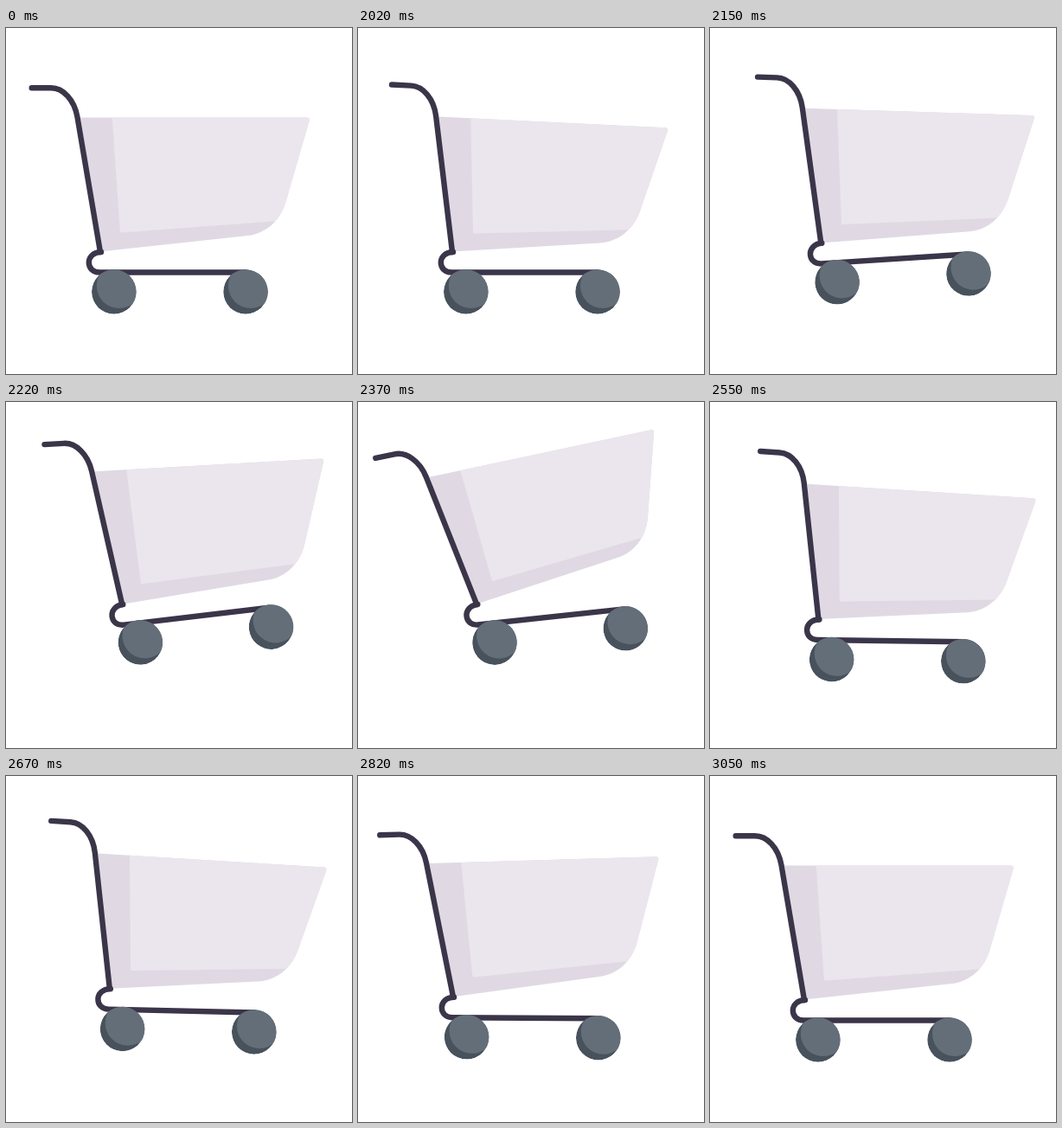
Animation of 400 by 400 pixels, one loop 3.07 s. Source, as an HTML page:

```html
<!DOCTYPE html>
<html lang="en">
<head>
<meta charset="utf-8">
<title>Hopping cart</title>
<style>
  html, body { margin: 0; width: 100%; height: 100%; overflow: hidden; background: #fff; }
  svg { display: block; width: 100%; height: 100%; }
  .bar { fill: none; stroke: #3b3549; stroke-width: 6.4; stroke-linecap: round; stroke-linejoin: round; }
</style>
</head>
<body>
<svg viewBox="0 0 400 400">
  <defs>
    <path id="tub" d="M86 103.5H348Q351.500 103.500 350.700 107L323.500 201C317.500 222 301 237.500 280 240L109 258.500Z"/>
    <clipPath id="inTub"><use href="#tub"/></clipPath>
    <clipPath id="inWheel"><circle r="25.8"/></clipPath>
    <g id="wheel" clip-path="url(#inWheel)">
      <circle r="25.8" fill="#48525d"/>
      <circle cx="6" cy="-7" r="26" fill="#646e78"/>
    </g>
  </defs>
  <g id="cart">
    <g id="basket">
      <use href="#tub" fill="#e0d9e4"/>
      <path d="M122.500 100L131.900 235Q132 236.500 133.500 236.400L311 223.300L370 200V100Z" fill="#ebe6ed" clip-path="url(#inTub)"/>
      <path class="bar" d="M29.700 69.200H52C66 69.200 79 83 82.500 103L109 259"/>
    </g>
    <path class="bar" d="M110 259C101 259 95.800 265 95.800 271C95.800 278 101 282.500 108 282.500H277"/>
    <use href="#wheel" transform="translate(124.800 305)"/>
    <use href="#wheel" transform="translate(277 305)"/>
  </g>
</svg>
<script>
const LOOP = 3070, START = 2020, STEP = 25, LAST = 41;
const LAND = 18.4, SETTLE = 33;
const cart = document.getElementById('cart');
const basket = document.getElementById('basket');

// Parabolic arc from a to b, zero outside.
function arc(k, a, b, height) {
  const u = (k - a) / (b - a);
  return height * Math.max(0, 4 * u * (1 - u));
}

// Swings between turning points [step, value] with a sine ease.
function swing(k, points) {
  const i = points.findIndex(p => p[0] > k);
  if (i < 0) return points.at(-1)[1];
  const [[a, from], [b, to]] = [points[i - 1], points[i]];
  return from + (to - from) * (1 - Math.cos(Math.PI * (k - a) / (b - a))) / 2;
}

function pose(k) {
  return {
    x: k < 12.5 ? arc(k, 0, 25, 34.5) : swing(k, [[12.5, 34.5], [20, 16], [34, 0]]),
    y: -arc(k, 3.4, LAND, 42.3) - arc(k, LAND, SETTLE, 10.8),
    lean: arc(k, LAND, SETTLE, 1.3) - arc(k, 2.8, LAND, 7.6),
    tilt: swing(k, [[-6, 0], [6, 5.6], [13.3, -6.2], [19, 3], [25, 2.4], [32, -2], [40, 0]])
  };
}

function draw() {
  const t = performance.now() % LOOP;
  const k = t < START ? LAST : Math.floor((t - START) / STEP);
  const { x, y, lean, tilt } = pose(k);
  cart.setAttribute('transform', `translate(${x} ${y}) rotate(${lean} 201 305)`);
  basket.setAttribute('transform', `rotate(${tilt} 109 259)`);
  requestAnimationFrame(draw);
}
draw();
</script>
</body>
</html>
```
